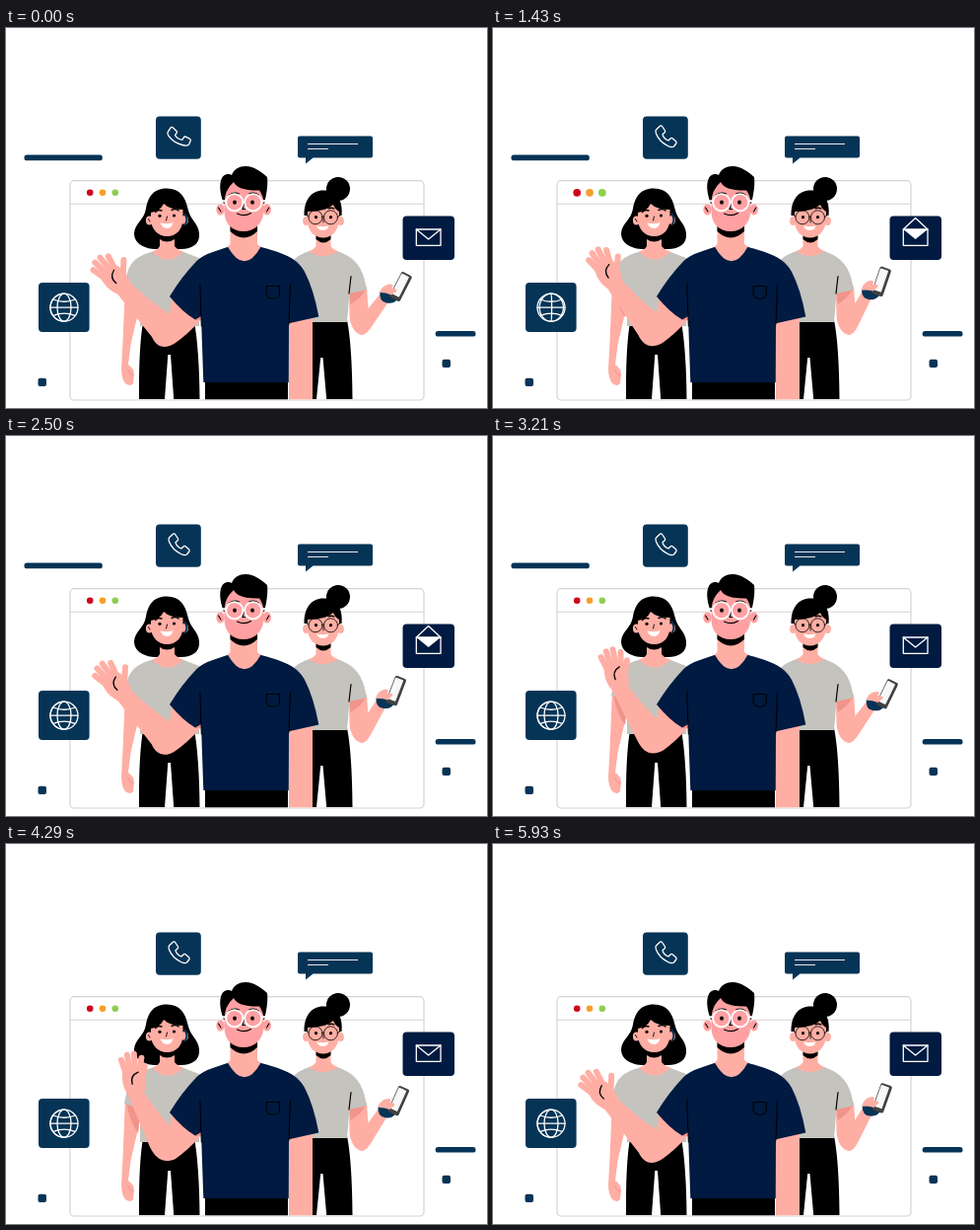
An HTML page for the animation above (6000 ms loop, 488x385 px).

```html
<!DOCTYPE html>
<html lang="en">
<head>
<meta charset="utf-8">
<title>Support team</title>
<style>
html, body { margin: 0; width: 100%; height: 100%; overflow: hidden; background: #fff; }
svg { display: block; width: 488px; height: 385px; }
.tile { fill: #063456; }
.navy { fill: #001a41; }
.skin { fill: #ffaea4; }
.blush { fill: #ffa0a2; }
.shade { fill: #f1948b; }
.gray { fill: #c4c3be; }
.white { fill: #fff; }
.line { fill: none; stroke: #000; stroke-linecap: round; stroke-linejoin: round; }
.icon { fill: none; stroke: #fff; stroke-width: 1.3; stroke-linecap: round; stroke-linejoin: round; }
</style>
</head>
<body>
<svg viewBox="0 0 488 385">
  <!-- browser window -->
  <rect x="65" y="154.7" width="359" height="222.3" rx="4" fill="#fff" stroke="#d5d3d3" stroke-width="1.2"/>
  <path d="M65 178.3H424" stroke="#dbd0d0" stroke-width="1.1"/>
  <g id="dots">
    <circle cx="85.2" cy="166.8" fill="#d0021b"/>
    <circle cx="98" cy="166.8" fill="#f5a02a"/>
    <circle cx="110.8" cy="166.8" fill="#8ccf4d"/>
  </g>

  <!-- tiles and bars -->
  <g class="tile">
    <rect x="152" y="89.5" width="45.8" height="43.3" rx="4"/>
    <rect x="33" y="258" width="51.6" height="50" rx="4"/>
    <rect id="bar" x="18.5" y="128.5" width="79.3" height="5.8" rx="2.6"/>
    <rect x="435.7" y="307" width="40.8" height="5.6" rx="2.6"/>
    <rect x="442.5" y="335.7" width="8.5" height="8.4" rx="2"/>
    <rect x="32.5" y="354.7" width="8.5" height="8.4" rx="2"/>
    <path d="M298 109.500H370Q372 109.500 372 111.500V129.500Q372 131.500 370 131.500H311.500L304 137.500V131.500H298Q296 131.500 296 129.500V111.500Q296 109.500 298 109.500Z"/>
  </g>
  <path d="M306 117.500H357M306 122.500H327" stroke="#e4ebf0" stroke-width="1"/>
  <path id="call" class="icon" d="M-10 -7L-6 -10.800Q-5 -11.500 -4 -10.500L-1 -6Q-.5 -5 -1.500 -4L-3.500 -2.200Q-2.500 2 2.500 4L4.500 2Q5.500 1 6.500 1.700L10.300 5Q11 6 10.300 7L8 10Q6 11.500 2 9.500Q-7 5 -10 -3Q-11 -6 -10 -7Z"/>
  <g class="icon">
    <circle cx="59" cy="283.2" r="14"/>
    <path d="M45 283.200H73M48 275Q59 279.500 70 275M48 291.400Q59 287 70 291.400"/>
    <path id="globe"/>
  </g>
  <rect class="navy" x="402.5" y="190.5" width="52.5" height="44.5" rx="4"/>
  <path id="letter" class="white"/>
  <path class="icon" d="M416.300 204H441V220.300H416.300Z"/>
  <path id="flap" class="icon"/>

  <!-- woman on the left -->
  <path d="M163 162.500C149 162.500 144 172 142 183C140 195 131 197 130 208C130 218 140 224 153 224H177C190 224 197 218 196 208C195 197 187 195 184.500 183C182 171 176 162.500 163 162.500Z"/>
  <path class="skin" d="M121 258L136 266L133.500 291L126.500 321L124 341Q130 345 130 351L129 360Q126 364 121 360Q117 355 117 345L118.500 318Z"/>
  <path d="M123.500 346Q125.500 352 129 352" fill="none" stroke="#ef8f86" stroke-width=".8"/>
  <path class="shade" d="M122 262L137 268L134 293Q126 283 122 262Z"/>
  <path d="M139 298H191Q196 325 196.500 376H170.200L167 331H164.300L161 376H135Q134.500 325 139 298Z"/>
  <path class="gray" d="M149 226.500C137 230 127 234 123 248L120 263L136 268V302H196V233L179 226.500Z"/>
  <path class="skin" d="M156 206H171V221Q174 225 180 226.500Q164 243 148 226.500Q154 225 156 221Z"/>
  <path d="M156 209Q164 212 171 209V214Q163 219 156 214Z"/>
  <g class="skin">
    <ellipse cx="145.500" cy="195" rx="3.600" ry="4.500"/>
    <ellipse cx="181.500" cy="194.500" rx="3.400" ry="4.500"/>
    <path d="M147 187Q156 186 160 178Q166 184 179.500 184V194C179 205 172 211 163.500 211C154 211 147.500 204 147 194Z"/>
  </g>
  <circle cx="156" cy="190.300" r="1.600"/><circle cx="170.500" cy="190" r="1.600"/>
  <path class="line" d="M151.500 186.500Q154 183.500 158 185M168 184.500Q172 182.500 175 185" stroke-width="1.400"/>
  <path class="line" d="M163.500 191L162.500 195M144.500 193.500L146 196" stroke-width=".9"/>
  <path class="white" d="M156.500 197.300Q163 199.500 169.500 197Q168 203 163 203Q158.500 203 156.500 197.300Z"/>
  <path d="M181 188Q186 194 181 200" fill="none" stroke="#063456" stroke-width="2"/>

  <!-- woman on the right -->
  <circle cx="337" cy="163" r="12"/>
  <path d="M302.500 190C302 174 310 164.500 322 164.500C335 164.500 342 174 340.500 190Z"/>
  <path d="M310 296H346Q351 320 351.500 376H325.200L321.500 334H319.200L315 376H309Z"/>
  <path class="skin" d="M348 266L366 262L368 290Q371 309 361 311Q351 309 348.500 293Z"/>
  <path class="shade" d="M348.500 267L365 264.500Q361 273 349.500 280Z"/>
  <path class="gray" d="M308 226C296 230 290 234 284 248V298H346L348.500 269L366 265C363 246 357 233 336 226Z"/>
  <path class="line" d="M350 251.500L348 269" stroke-width="1.200"/>
  <path class="skin" d="M314.500 206H329.500V221Q332 225 337 226Q322 236 307 226Q312 225 314.500 221Z"/>
  <path d="M314.500 210Q322 213 329.500 210V214Q322 221 314.500 214Z"/>
  <g class="skin">
    <ellipse cx="304.500" cy="195.500" rx="3.400" ry="4.500"/>
    <ellipse cx="339.500" cy="195.500" rx="3.400" ry="4.500"/>
    <path d="M306 186Q325 186 332 179Q334 184 338 186V195C337 206 330 212.500 322 212.500C313 212.500 306 206 306 195Z"/>
  </g>
  <circle cx="314.500" cy="191.700" r="1.600"/><circle cx="329.500" cy="191.700" r="1.600"/>
  <path class="line" d="M311 183.500Q314 182 317 183.500M327 183Q330 181.500 333 183" stroke-width="1.300"/>
  <g class="line" stroke-width=".8">
    <path d="M322 193V197M305 190L307 191M337 191L339 190M321 191H322.500"/>
    <circle cx="314" cy="191.800" r="7"/>
    <circle cx="329.500" cy="191.800" r="7"/>
  </g>
  <path class="white" d="M315 200.500Q321 202 327.500 200.500Q326 205 321.500 205Q317 205 315 200.500Z"/>
  <g id="phoneArm">
    <path class="skin" d="M361 311Q367 309.500 372 301L387 279L380 269L366 286L354 300Q355 309 361 311Z"/>
    <path class="tile" d="M379.500 267Q378 277 386 278.500Q393 280 397 275L392 265Z"/>
    <g transform="translate(400.500 262) rotate(27)">
      <rect x="-6" y="-14.500" width="12" height="29" rx="2" fill="#414141"/>
      <rect x="-5.300" y="-12.500" width="8.600" height="23" rx=".8" fill="#f8f8f8"/>
    </g>
    <path class="skin" d="M379.500 268C380 262 387 259 391 259.500Q394 261 391 263.500L396 264.500Q397.500 267 394 268L391 270.500Q385 268 379.500 268Z"/>
  </g>

  <!-- waving arm -->
  <path id="forearm" class="skin"/>
  <g id="hand">
    <g id="fingers" stroke="#ffaea4" stroke-width="6" stroke-linecap="round"></g>
    <path class="skin" d="M-8.500 3C-13 -5 -14 -12 -12.500 -20L7 -22C11 -16 12 -8 8.500 4Z"/>
    <path class="line" d="M-3 -6.500Q-5.500 -15 3 -18.500" stroke-width="1.300"/>
  </g>

  <!-- man -->
  <path d="M202 356H286V376.300H202Z"/>
  <path class="skin" d="M287 292H311V376.300H287Z"/>
  <path class="shade" d="M178 280L199 289L197 296L192 296Z"/>
  <path class="navy" d="M226 221.500C214 226 202 228 193.500 236Q178 252 166 272Q179 288 192 295.500L198 292L200.300 359H286.800L287 299.200L317.300 292.500Q312 264 303 247C295 232 280 228 257.500 221.500Z"/>
  <path class="line" d="M196.800 259L198.300 302M288.500 259L287 300M264 261.500H277.500V269Q277 274 270.700 274.300Q264.500 274 264 269Z" stroke-width="1.100"/>
  <path class="skin" d="M227.500 198H255V219L258.500 221.700Q242 251 225 221.700L227.500 219Z"/>
  <path d="M227.500 201H255V206Q241 219 227.500 206Z"/>
  <path d="M221 178C217 168 216 158 219 152C221 148 226 147 229 149C231 143 237 140 243 140C252 140.500 258 145 265 151C266 160 264 170 262 178Z"/>
  <g class="blush">
    <ellipse cx="217.500" cy="184" rx="4.200" ry="5.600"/>
    <ellipse cx="264.800" cy="184" rx="4.200" ry="5.600"/>
    <path d="M221.500 178Q221.500 164 231 156Q235 165 257 164.500Q261.500 170 261.500 179V186C260.500 198 253 206 241 206C229 206 221.500 198 221.500 186Z"/>
  </g>
  <path class="line" d="M226.500 169.500Q231 166 236 168M247 168Q252 166 256 169.500" stroke-width="1.700"/>
  <path class="line" d="M242 177L240 183.500H242.500M234.500 188Q242 191.500 248.500 187.500M215.500 182L218 186M266.800 182L264.500 186" stroke-width="1.100"/>
  <ellipse class="eye" cx="232" cy="176.700" rx="1.900"/>
  <ellipse class="eye" cx="250" cy="176.700" rx="1.900"/>
  <g fill="none" stroke="#fff" stroke-width="1.900">
    <circle cx="231.800" cy="176.700" r="8.600"/>
    <circle cx="250.700" cy="176.700" r="8.600"/>
    <path d="M218 175L223.500 175.500M259 175.500L264.500 175"/>
  </g>
</svg>
<script>
const $ = id => document.getElementById(id);
const LOOP = 6000, TAU = Math.PI * 2;
const mix = (a, b, k) => a + (b - a) * k;
const ramp = (t, a, b) => {
  const k = Math.min(1, Math.max(0, (t - a) / (b - a)));
  return k * k * (3 - 2 * k);
};
const set = (el, attrs) => Object.entries(attrs).forEach(([k, v]) => el.setAttribute(k, v));

function wave(t) {
  const p = (1 - Math.cos(TAU * t / 1200)) / 2;
  const x = mix(118, 132, p), y = mix(262, 249, p), turn = mix(-36, 1.5, p);
  const a = turn * Math.PI / 180;
  const at = (u, v) => `${x + u * Math.cos(a) - v * Math.sin(a)} ${y + u * Math.sin(a) + v * Math.cos(a)}`;
  set($('forearm'), {
    d: `M${at(-8.5, 2)}L${mix(148, 146, p)} ${mix(313, 307, p)}C152 ${mix(322, 319, p)} 160 ${mix(327, 324, p)} 172 319Q186 309 198 295L169 270L166 ${mix(290, 286, p)}Q${mix(145, 152, p)} ${mix(276, 268, p)} ${at(8.5, 2)}Z`
  });
  set($('hand'), { transform: `translate(${x} ${y}) rotate(${turn})` });
  set($('fingers').lastChild, { x2: mix(17, 9.5, p), y2: mix(-21, -25, p) });
}

function globe(t) {
  const spin = 180 * ramp(t, 0, 1900);
  let d = '';
  for (let k = 0; k < 3; k++) {
    const lon = (60 * k + spin) % 180 - 90;
    const r = 14 * Math.sin(lon * Math.PI / 180);
    d += `M59 269.2A${Math.abs(r)} 14 0 0 ${r > 0 ? 1 : 0} 59 297.2`;
  }
  set($('globe'), { d });
}

function envelope(t) {
  const open = ramp(t, 800, 1250) - ramp(t, 2520, 2950);
  const tip = mix(214, 192.5, open);
  set($('flap'), { d: `M416.3 204L428.6 ${tip}L441 204` });
  set($('letter'), { d: `M416.3 204L428.6 214L441 204L428.6 ${Math.max(204, tip)}Z` });
}

function draw(t) {
  wave(t);
  globe(t);
  envelope(t);
  const sway = (1 - Math.cos(TAU * t / 3600)) / 2;
  set($('phoneArm'), { transform: `rotate(${-9 * sway} 361 305)` });
  const ring = t < 1048 ? 25 * Math.sin(TAU * t / 500 - 0.6) : 0;
  set($('call'), { transform: `translate(175.5 110) rotate(${ring})` });
  const pulse = t > 1300 && t < 2200 ? Math.sin(Math.PI * (t - 1300) / 900) : 0;
  for (const dot of $('dots').children) set(dot, { r: 3.3 + 1.3 * pulse });
  const shut = ramp(t, 2700, 2800) - ramp(t, 2820, 2920);
  document.querySelectorAll('.eye').forEach(e => set(e, { ry: mix(2.1, 0.4, shut) }));
  set($('bar'), { visibility: t < 3600 ? 'visible' : 'hidden' });
}

// four fingers, then the thumb
$('fingers').innerHTML = [[-9, -16, -14, -31], [-5, -18, -8, -36], [0, -18, -1, -37], [4, -16, 6.5, -33], [6, -7, 17, -21]]
  .map(([x1, y1, x2, y2]) => `<line x1="${x1}" y1="${y1}" x2="${x2}" y2="${y2}"/>`).join('');

const start = performance.now();
function tick() {
  draw((performance.now() - start) % LOOP);
  requestAnimationFrame(tick);
}
tick();
</script>
</body>
</html>
```
